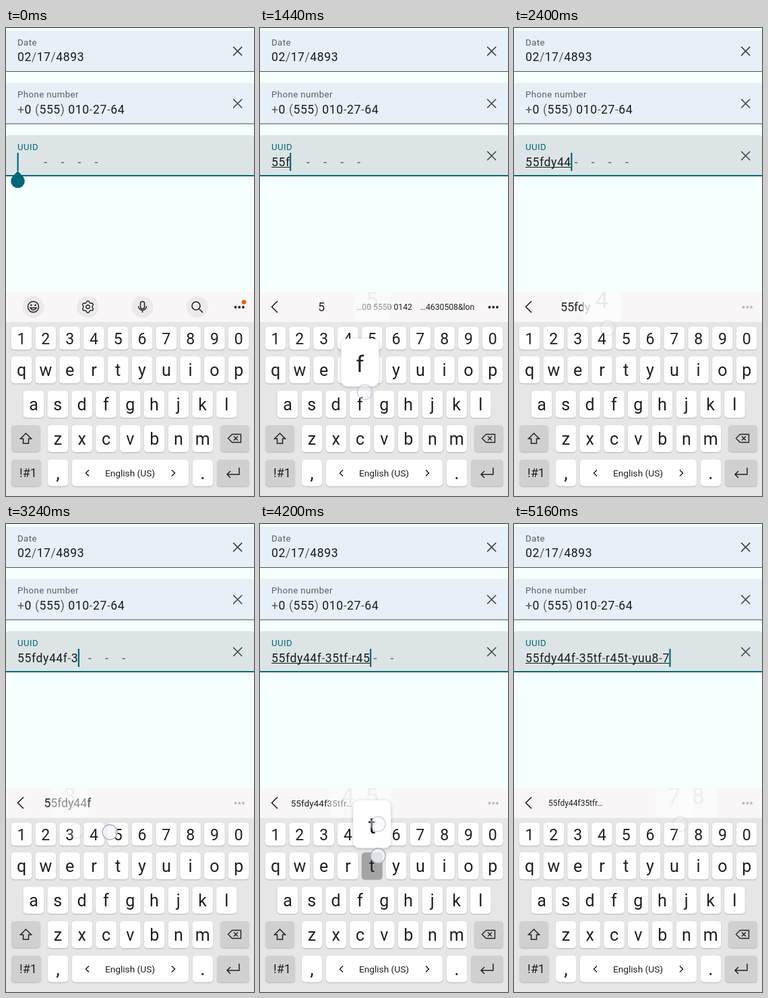
An HTML page with a canvas for the animation above (5400 ms loop, 368 px wide and 694 px high).

```html
<!DOCTYPE html>
<html lang="en">
<head>
<meta charset="utf-8">
<title>Masked input fields</title>
<style>
  html, body { margin: 0; width: 100%; height: 100%; overflow: hidden; background: #f5fffd; }
  canvas { display: block; }
</style>
</head>
<body>
<canvas id="stage" width="368" height="694"></canvas>
<script>
const ctx = document.getElementById('stage').getContext('2d');
const LOOP = 5400, STEP = 120;
const TEAL = '#006879', INK = '#171d1e', MUTED = '#566065', KEY_INK = '#202020';
const MASK = [8, 4, 4, 4, 0];

// Each press: key, time in ms, optional finger offset from the key centre
const presses = [
  ['5', 720], ['5', 1080], ['f', 1320, 7, -18], ['d', 1560], ['y', 1800],
  ['4', 2040], ['4', 2160], ['f', 2640, 7, -18], ['3', 3000, 10, -5],
  ['5', 3300, -12, -3], ['t', 3480], ['f', 3600], ['r', 3720, 4, 29],
  ['4', 3840], ['5', 4080], ['t', 4200], ['y', 4440], ['u', 4560, 25, -14],
  ['u', 4690, 25, -14], ['8', 4800], ['7', 4920]
].map(([key, at, dx = 9, dy = -15]) => ({ key, at, dx, dy }));

// Rows: letters, first centre, top, height, font size, baseline offset
const keys = {};
[['1234567890', 23, 443, 34, 23, 25.5], ['qwertyuiop', 23, 487, 40, 25, 29],
 ['asdfghjkl', 41, 538, 40, 25, 29], ['zxcvbnm', 77, 589, 40, 25, 29]]
  .forEach(([row, x, y, h, size, base]) => [...row].forEach((c, i) => {
    keys[c] = { x: x + 35.8 * i, y, h, size, base };
  }));

function box(x, y, w, h, r, fill) {
  ctx.fillStyle = fill;
  ctx.beginPath();
  ctx.roundRect(x, y, w, h, r);
  ctx.fill();
}

function raised(x, y, w, h, r, fill, blur = 1.5, offset = 1) {
  ctx.save();
  ctx.shadowColor = 'rgba(0,0,0,.22)';
  ctx.shadowBlur = blur;
  ctx.shadowOffsetY = offset;
  box(x, y, w, h, r, fill);
  ctx.restore();
}

function text(str, x, y, size, color = KEY_INK, align = 'center', spacing = 0) {
  ctx.font = `${size}px Roboto, sans-serif`;
  ctx.letterSpacing = spacing + 'px';
  ctx.textAlign = align;
  ctx.fillStyle = color;
  ctx.fillText(str, x, y);
  return ctx.measureText(str).width;
}

function line(path, color = KEY_INK, width = 1.5, x = 0, y = 0) {
  ctx.save();
  ctx.translate(x, y);
  ctx.strokeStyle = color;
  ctx.lineWidth = width;
  ctx.stroke(new Path2D(path));
  ctx.restore();
}

function disc(x, y, r, color) {
  ctx.fillStyle = color;
  ctx.beginPath();
  ctx.arc(x, y, r, 0, 7);
  ctx.fill();
}

// Draws mask characters in a muted tone and returns the x after the last one
function maskedText(str, x, y) {
  for (const c of str) x += text(c, x, y, 17.6, /\w/.test(c) ? INK : MUTED, 'left', .55);
  return x;
}

function field(y, label, fill, accent, lineHeight) {
  box(0, y, 368, 61, [4, 4, 0, 0], fill);
  ctx.fillStyle = accent;
  ctx.fillRect(0, y + 61 - lineHeight, 368, lineHeight);
  text(label, 17, y + 21.5, 13.2, accent === TEAL ? TEAL : MUTED, 'left', .44);
}

function clearIcon(y) {
  line('M-6.5-6.5 6.5 6.5M6.5-6.5-6.5 6.5', '#3f484b', 1.7, 343.7, y);
}

function splitMask(typed) {
  let head = '', tail = '', rest = typed;
  MASK.forEach((n, i) => {
    const part = n ? rest.slice(0, n) : rest;
    rest = rest.slice(part.length);
    const dash = i < 4 ? '-' : '';
    const gap = ' '.repeat(Math.max(0, n - part.length));
    if (rest) head += part + dash;
    else { head += part; tail += gap + dash; }
  });
  return [head, tail];
}

function drawFields(t, typed) {
  field(4, 'Date', '#e6f0f6', '#4a5356', 1);
  maskedText('02/17/4893', 17, 49.3);
  clearIcon(34.3);
  field(81.5, 'Phone number', '#e6f0f6', '#4a5356', 1);
  maskedText('+0 (555) 010-27-64', 17, 127);
  clearIcon(112);
  field(159, 'UUID', '#dce4e6', TEAL, 2);

  const [head, tail] = splitMask(typed);
  const caret = maskedText(head, 17, 204.5);
  maskedText(tail, caret, 204.5);
  const composing = t < 3120 || t >= 3360;
  if (typed && composing) {
    ctx.fillStyle = INK;
    ctx.fillRect(17, 206, caret - 17, 1);
  }
  ctx.fillStyle = TEAL;
  if (t < 360 || t >= 720) ctx.fillRect(caret - .5, 185, 2.2, 27);
  if (typed) clearIcon(189.5);
  else {
    disc(17.5, 227, 10.3, TEAL);
    ctx.fill(new Path2D('M17.5 212 25 220H10Z'));
  }
}

function drawIcons() {
  [40.5, 121.5, 202.5, 283.5].forEach(x => disc(x, 413.5, 16, '#ebe9ea'));
  line('M8 0A8 8 0 1 1-8 0A8 8 0 1 1 8 0M-4.5 1.5Q0 8 4.5 1.5Z', KEY_INK, 1.5, 40.5, 413.5);
  disc(37.5, 411, 1.3, KEY_INK);
  disc(43.5, 411, 1.3, KEY_INK);

  let gear = '';
  for (let i = 0; i < 24; i++) {
    const a = (i - .5) * Math.PI / 12, r = i % 4 < 2 ? 8.6 : 6.7;
    gear += (i ? 'L' : 'M') + r * Math.sin(a) + ' ' + -r * Math.cos(a);
  }
  line(gear + 'ZM2.8 0A2.8 2.8 0 1 1-2.8 0A2.8 2.8 0 1 1 2.8 0', KEY_INK, 1.4, 121.5, 413.5);
  line('M-3-5A3 3 0 0 1 3-5V0A3 3 0 0 1-3 0ZM-6-1A6 6 0 0 0 6-1M0 5V8.5', KEY_INK, 1.5, 202.5, 413.5);
  line('M4.5-1.5A6 6 0 1 1-7.5-1.5A6 6 0 1 1 4.5-1.5M3 3 8.5 8.5', KEY_INK, 1.6, 283.5, 413.5);
  disc(353, 406.5, 3.3, '#e8590c');
}

function drawSuggestions(word) {
  line('M26 405 17.5 413.5 26 422', KEY_INK, 1.6);
  ctx.letterSpacing = '0px';
  ctx.font = '17.6px Roboto, sans-serif';
  const size = Math.max(12, Math.min(17.6, 17.6 * 83 / ctx.measureText(word).width));
  const label = word.length > 12 ? word.slice(0, 13) + '…' : word;
  text(label, 91.3, 413.7 + size * .36, size);
  if (word.length === 1) {
    text('…00 5550 0142', 184.5, 418, 12.2);
    text('…4630508&lon', 278, 418, 12.2);
  }
}

function drawKeyboard(pressed) {
  box(0, 436, 368, 258, 0, '#e6e6e6');
  for (const [c, k] of Object.entries(keys)) {
    raised(k.x - 15.3, k.y, 30.6, k.h, 5, pressed.has(c) ? '#a3a3a3' : '#fff');
    text(c, k.x, k.y + k.base, k.size);
  }
  [[8, 589, 43], [318, 589, 43], [8, 640, 44], [313, 640, 48]]
    .forEach(([x, y, w]) => raised(x, y, w, 39.5, 5, '#d0d0d0'));
  [[62, 30], [98, 173], [277, 30]]
    .forEach(([x, w]) => raised(x, 640, w, 39.5, 5, '#fff'));

  line('M0-8 8 0H4V7H-4V0H-8Z', KEY_INK, 1.5, 29.5, 609);
  line('M-10 0-4-6H9V6H-4ZM-1.5-3 4.5 3M4.5-3-1.5 3', KEY_INK, 1.4, 339.5, 608.5);
  line('M9-7V3H-9M-4-2-9 3-4 8', KEY_INK, 1.5, 337, 659);
  line('M123 655.5 118.5 660 123 664.5M246 655.5 250.5 660 246 664.5', KEY_INK, 1.5);
  text('!#1', 33, 666, 18);
  text(',', 77, 669, 28);
  text('.', 292, 669, 28);
  text('English (US)', 184, 665, 13.7);
}

function drawPopup({ key }) {
  const { x, y } = keys[key];
  raised(x - 28, y - 77.5, 56, 71, 9, '#fff', 5, 1);
  text(key, x, y - 28.5, 34);
}

function drawTouch({ key, dx, dy }, alpha) {
  const k = keys[key], x = k.x + dx, y = k.y + k.h / 2 + dy;
  ctx.globalAlpha = alpha;
  disc(x, y, 11, 'rgba(246,246,252,.75)');
  ctx.strokeStyle = '#a9aec9';
  ctx.lineWidth = 1.3;
  ctx.stroke();
  ctx.globalAlpha = 1;
}

function draw(t) {
  const committed = until => presses.filter(p => until >= p.at + 100).map(p => p.key).join('');
  const word = committed(t - 300);
  const latest = presses.filter(p => t >= p.at).pop();

  box(0, 0, 368, 694, 0, '#f5fffd');
  drawFields(t, committed(t));
  box(0, 392, 368, 44, 0, '#f8f6f6');
  if (word) drawSuggestions(word);
  else drawIcons();
  const dots = t >= 1920 ? '#b9b7b8' : KEY_INK;
  [340.5, 346.3, 352].forEach(x => disc(x, 414, 1.9, dots));

  // Released previews linger faintly over the toolbar
  ctx.save();
  ctx.beginPath();
  ctx.rect(0, 392, 368, 43);
  ctx.clip();
  for (const p of presses) {
    const age = t - p.at;
    if (age < 120 || age >= 400 || (p === latest && age < 240)) continue;
    const { x, y } = keys[p.key];
    ctx.globalAlpha = .5;
    box(x - 28, y - 77.5, 56, 71, 9, '#fff');
    ctx.globalAlpha = .06;
    text(p.key, x, y - 28.5, 34);
  }
  ctx.restore();

  drawKeyboard(new Set(presses.filter(p => t >= p.at && t < p.at + 100).map(p => p.key)));
  if (latest && t - latest.at < 240) drawPopup(latest);
  for (const p of presses) {
    const age = t - p.at;
    if (age > -100 && age <= 240) drawTouch(p, age < 100 ? 1 : age < 200 ? .55 : .25);
  }
}

const start = performance.now();
function tick() {
  const t = (performance.now() - start) % LOOP;
  draw(Math.min(5160, Math.floor(t / STEP) * STEP));
  requestAnimationFrame(tick);
}
tick();
</script>
</body>
</html>
```
